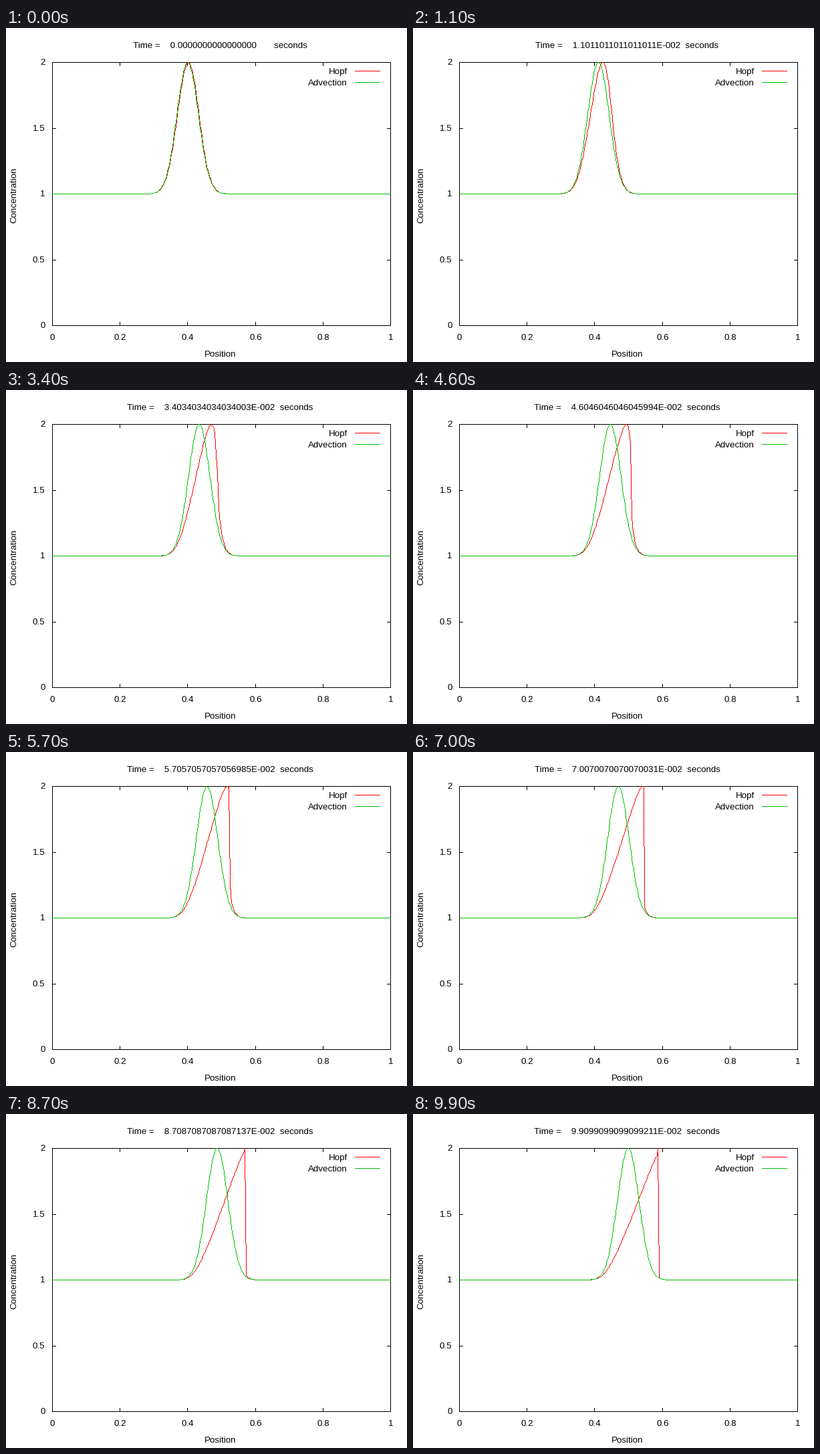
A matplotlib script for the animation above (10000 ms loop, 600 by 500 pixels).

```python
import numpy as np
import matplotlib.pyplot as plt
from matplotlib.animation import FuncAnimation

W, H, DPI = 600, 500, 100
FRAMES = 100
DT = 1 / 999
LEFT, RIGHT, TOP, BOTTOM = 69, 575, 51, 445
BLACK, RED, GREEN = (0, 0, 0), (255, 0, 0), (0, 192, 0)

plt.rcParams["font.family"] = "Liberation Sans"
plt.rcParams["font.size"] = 9.6

fig = plt.figure(figsize=(W / DPI, H / DPI), dpi=DPI, facecolor="white")
ax = fig.add_axes([0, 0, 1, 1])
ax.axis("off")


def to_x(v):
    return np.floor(LEFT + 0.5 + (RIGHT - LEFT) * np.asarray(v)).astype(int)


def to_y(v):
    return np.floor(BOTTOM + 0.5 - (BOTTOM - TOP) * np.asarray(v) / 2).astype(int)


def stroke(canvas, xs, ys, color):
    """Hard-edged polyline, one pixel wide, through whole pixels."""
    for x0, y0, x1, y1 in zip(xs[:-1], ys[:-1], xs[1:], ys[1:]):
        n = max(abs(x1 - x0), abs(y1 - y0))
        s = np.arange(n + 1) / max(n, 1)
        px = np.floor(x0 + s * (x1 - x0) + 0.5).astype(int)
        py = np.floor(y0 + s * (y1 - y0) + 0.5).astype(int)
        canvas[py, px] = color


def label(x, y, s="", ha="center", va="baseline", **kw):
    return ax.text(x, y, s, ha=ha, va=va, **kw)


# Frame, mirrored inward ticks, labels and legend
base = np.full((H, W, 3), 255, dtype=np.uint8)
stroke(base, [LEFT, RIGHT, RIGHT, LEFT, LEFT],
       [TOP, TOP, BOTTOM, BOTTOM, TOP], BLACK)
for v in (0, 0.2, 0.4, 0.6, 0.8, 1):
    x = to_x(v)
    stroke(base, [x, x], [BOTTOM, BOTTOM - 5], BLACK)
    stroke(base, [x, x], [TOP, TOP + 5], BLACK)
    label(x + 0.5, 467, f"{v:g}")
for v in (0, 0.5, 1, 1.5, 2):
    y = to_y(v)
    stroke(base, [LEFT, LEFT + 5], [y, y], BLACK)
    stroke(base, [RIGHT, RIGHT - 5], [y, y], BLACK)
    label(58.5, y + 4, f"{v:g}", ha="right")
for name, y, color in (("Hopf", 64, RED), ("Advection", 81, GREEN)):
    label(511, y + 5, name, ha="right")
    stroke(base, [522, 559], [y, y], color)

label(320.5, 492, "Position")
label(18, 250, "Concentration", ha="right", va="center", rotation=90)
title = label(320.5, 30)
picture = ax.imshow(base, extent=(0, W, H, 0), aspect="auto",
                    interpolation="nearest")
ax.set(xlim=(0, W), ylim=(H, 0))


def pulse(x):
    return 1 + np.exp(-500 * (x - 0.4) ** 2)


grid = np.arange(0.25, 0.7001, 0.0025)
xi = np.linspace(0.15, 0.7, 5501)
u0 = pulse(xi)
potential = np.cumsum(u0) * (xi[1] - xi[0])
distance2 = (grid[:, None] - xi) ** 2 / 2


def hopf_profile(t):
    """Entropy solution of u_t + u u_x = 0 by the Hopf-Lax formula."""
    foot = np.argmin(potential + distance2 / t, axis=1)
    u = u0[foot]
    drop = u[:-1] - u[1:]
    j = np.argmax(drop)
    if t > 0.056 and drop[j] > 0.5:
        u[j] = 2  # overshoot at the shock, cut off by the top of the plot
    return u


def draw_curve(canvas, u, color):
    stroke(canvas, to_x(np.r_[0, grid, 1]), to_y(np.r_[1, u, 1]), color)


times = [0.0]
while len(times) < FRAMES:
    times.append(times[-1] + DT)


def caption(t):
    if t == 0:
        return f"Time =    {t:.16f}       seconds"
    number = f"{t:.16E}".replace("E-0", "E-00")
    return f"Time =    {number}  seconds"


def update(i):
    t = times[i]
    canvas = base.copy()
    draw_curve(canvas, hopf_profile(t + DT), RED)
    draw_curve(canvas, pulse(grid - t), GREEN)
    picture.set_data(canvas)
    title.set_text(caption(t))
    return picture, title


anim = FuncAnimation(fig, update, frames=FRAMES, interval=100,
                     repeat=True, repeat_delay=0, blit=False)
plt.show()
```
